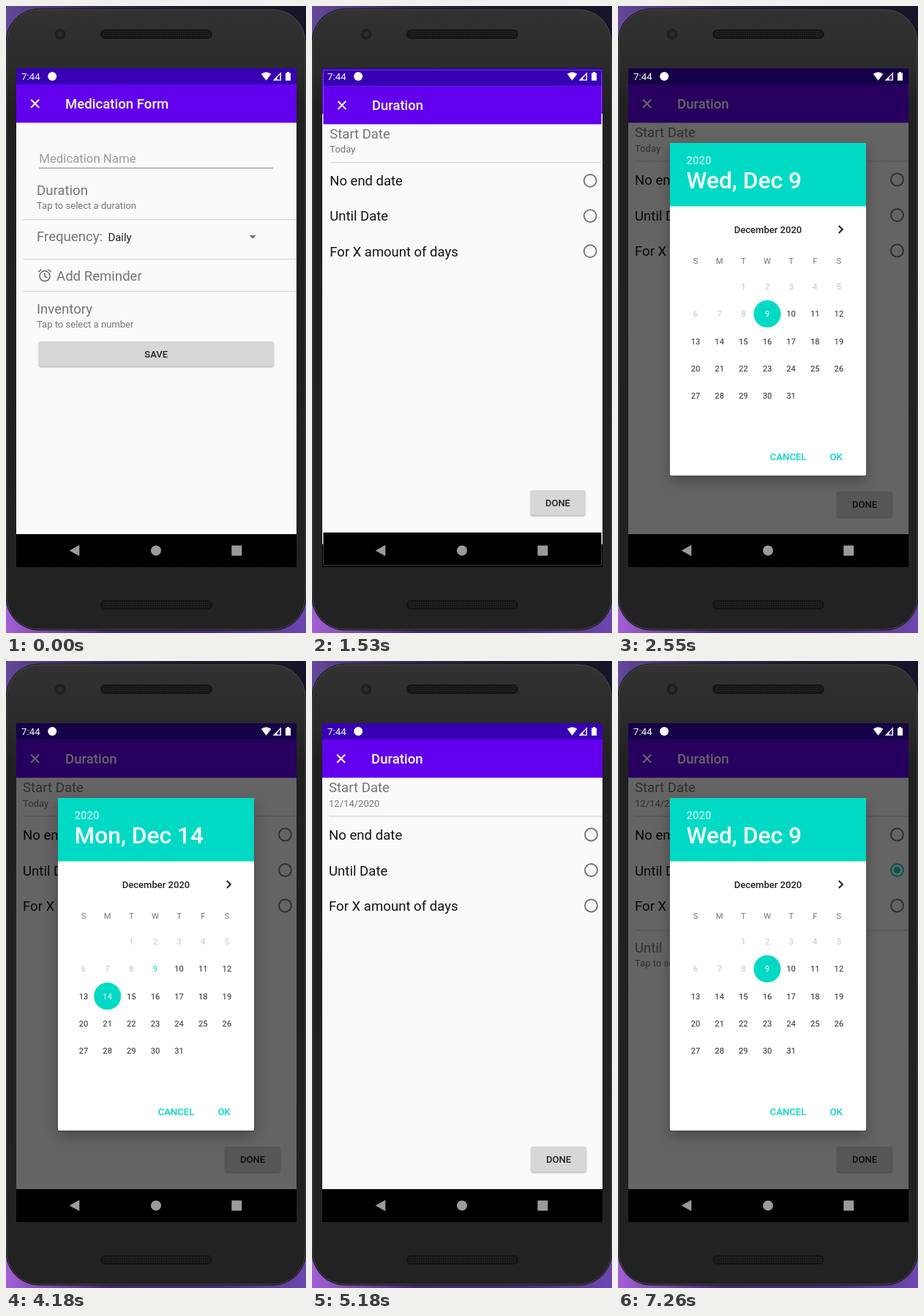
An HTML page for the animation above (8000 ms loop, 410x856 px).

```html
<!DOCTYPE html>
<html lang="en">
<head>
<meta charset="utf-8">
<title>Medication form</title>
<style>
  html, body { margin: 0; width: 100%; height: 100%; overflow: hidden; background: #222; }
  svg { display: block; width: 410px; height: 856px; font-family: Roboto, sans-serif; }
  .shadow { filter: drop-shadow(0 1px 1px rgba(0, 0, 0, .35)); }
  .lifted { filter: drop-shadow(0 8px 9px rgba(0, 0, 0, .28)); }
</style>
</head>
<body>
<svg id="stage" viewBox="0 0 410 856"></svg>
<script>
const LOOP = 8000;
const TEAL = '#00dac5', GREY = '#757575', INK = '#141414';
const LARGE = 18.6, SMALL = 13.05;

const REFRESHES = [0, 1240, 1310, 1380, 1450, 1530, 1610, 1690, 2230, 2310, 2390, 2470, 2550,
  4100, 4180, 5030, 5110, 5180, 6190, 6270, 6340, 6420, 6490, 6570, 6640, 7110, 7190, 7260];

const rect = (x, y, w, h, fill, more = '') =>
  `<rect x="${x}" y="${y}" width="${w}" height="${h}" fill="${fill}" ${more}/>`;
const circle = (x, y, r, fill, more = '') =>
  `<circle cx="${x}" cy="${y}" r="${r}" fill="${fill}" ${more}/>`;
const line = (d, stroke, width = 2) =>
  `<path d="${d}" fill="none" stroke="${stroke}" stroke-width="${width}"/>`;
const text = (x, y, size, fill, str, more = '') =>
  `<text x="${x}" y="${y}" font-size="${size}" fill="${fill}" ${more}>${str}</text>`;
const group = (id, body) => `<g id="${id}">${body}</g>`;
const MEDIUM = 'font-weight="500"';
const CENTER = 'text-anchor="middle"';

const divider = y => rect(23, y, 374, 1.3, '#d9d9d9');
const highlight = (id, x, baseline, w) => rect(x, baseline - 19, w, 24, '#000', `id="${id}" opacity="0"`);
const button = (x, y, w, h, label) =>
  rect(x, y, w, h, '#d6d7d7', 'rx="2" class="shadow"') +
  text(x + w / 2, y + h / 2 + 4.6, SMALL, '#212121', label, `${MEDIUM} ${CENTER}`);

const windowFrame = (title, body) =>
  rect(14, 85, 383, 681, '#fafafa') +
  rect(14, 85, 383, 22.4, '#3700b3') +
  rect(14, 107, 383, 52.4, '#6200ee') +
  line('M34.2 127.7l11 11m0-11l-11 11', '#fff') +
  text(81, 140, LARGE, '#fff', title, MEDIUM) +
  body + rect(14, 721, 383, 45, '#000');

const alarmIcon =
  circle(53, 368.7, 7, 'none', `stroke="${GREY}" stroke-width="1.7"`) +
  line('M53 364.5v4.7l3.4 2M44.2 363.2l4.2-3.6M61.8 363.2l-4.2-3.6', GREY, 1.6);

const formScreen = () => windowFrame('Medication Form',
  text(45.3, 214, 16.8, '#9c9c9c', 'Medication Name') + rect(45, 220.7, 320, 1, '#808080') +
  highlight('durationTap', 42, 258, 70) +
  text(42, 258, LARGE, GREY, 'Duration') +
  text(42, 277, SMALL, GREY, 'Tap to select a duration') + divider(291) +
  text(42, 321, LARGE, GREY, 'Frequency:') + text(139.5, 321, 14.9, '#212121', 'Daily') +
  `<path d="M332.5 313h9.4l-4.7 4.8z" fill="${GREY}"/>` + divider(345) +
  alarmIcon + text(69, 374.7, LARGE, GREY, 'Add Reminder') + divider(389) +
  text(42, 419.5, LARGE, GREY, 'Inventory') +
  text(42, 439, SMALL, GREY, 'Tap to select a number') +
  button(45, 458, 320.5, 34, 'SAVE'));

const option = (y, label, id = '') =>
  text(23, y + 7, LARGE, INK, label) +
  circle(381.5, y, 8.5, 'none', `stroke="${GREY}" stroke-width="1.9" ${id && `id="${id}"`}`);

const durationScreen = () => windowFrame('Duration',
  highlight('startTap', 23, 179, 83) +
  text(23, 179, LARGE, GREY, 'Start Date') +
  text(23, 198.7, SMALL, GREY, 'Today', 'id="startDate"') + divider(211.3) +
  circle(381.5, 285.5, 18, '#000', 'id="ripple" opacity="0"') +
  option(237, 'No end date') +
  option(285.5, 'Until Date', 'untilRing') + circle(381.5, 285.5, 0, TEAL, 'id="untilDot"') +
  option(334, 'For X amount of days') +
  group('untilSection', divider(367) + highlight('untilTap', 23, 397.7, 37) +
    text(23, 397.7, LARGE, GREY, 'Until') +
    text(23, 416.7, SMALL, GREY, 'Tap to select a date')) +
  button(299.6, 663, 74.8, 34.5, 'DONE'));

const columnX = col => 106 + 32.65 * col;
const dayPlace = day => {
  const cell = day + 1; // the month starts on a Tuesday
  return [columnX(cell % 7), 383 + 37.3 * Math.floor(cell / 7)];
};

function calendar() {
  let out = text(205, 309.5, SMALL, '#212121', 'December 2020', `${MEDIUM} ${CENTER}`) +
    line('M301.8 300l5 5l-5 5', '#212121');
  out += [...'SMTWTFS'].map((d, i) => text(columnX(i), 352, 11.2, GREY, d, CENTER)).join('');
  for (const day of [9, 14]) out += circle(...dayPlace(day), 18.5, TEAL, `id="mark${day}"`);
  for (let day = 1; day <= 31; day++) {
    const [x, y] = dayPlace(day);
    out += text(x, y + 4, 11.2, day < 9 ? '#c4c4c4' : '#2b2b2b', day, `${CENTER} id="day${day}"`);
  }
  return out;
}

const dialogBox = () =>
  rect(71, 187, 268, 454, '#fff', 'rx="2" class="lifted"') +
  `<path d="M71 273.5v-84.5q0-2 2-2h264q2 0 2 2v84.5z" fill="${TEAL}"/>` +
  text(93.5, 216, 14.9, '#fff', '2020', `${MEDIUM} opacity=".7"`) +
  text(93.5, 249, 31.7, '#fff', '', `${MEDIUM} id="picked"`) +
  group('calendar', calendar()) +
  text(232.5, 619.7, SMALL, TEAL, 'CANCEL', `${MEDIUM} ${CENTER}`) +
  text(298, 619.7, SMALL, TEAL, 'OK', `${MEDIUM} ${CENTER}`);

const speaker = y =>
  rect(129, y, 153, 13, '#151515', 'rx="6.5"') +
  rect(132, y + 2, 147, 9, 'url(#mesh)', 'rx="4"');

const gradient = (id, stops, direction = '') =>
  `<linearGradient id="${id}" ${direction}>` + stops.map(([at, color]) =>
    `<stop offset="${at}" stop-color="${color}"/>`).join('') + '</linearGradient>';

const phone = () => `<defs>
  ${gradient('above', [[0, '#64489a'], [.3, '#35264f'], [.6, '#1f1a2e'], [1, '#17142a']])}
  ${gradient('below', [[0, '#a25fd6'], [.35, '#44266c'], [.7, '#472a78'], [1, '#6d47b0']])}
  ${gradient('body', [[0, '#323232'], [.09, '#2b2b2b'], [.16, '#202020'], [1, '#222']], 'x2="0" y2="1"')}
  <pattern id="mesh" width="3" height="3" patternUnits="userSpaceOnUse">${circle(1.5, 1.5, .8, '#303030')}</pattern>
  <clipPath id="glass">${rect(14, 85, 383, 681, '#000')}</clipPath></defs>` +
  rect(0, 0, 410, 428, 'url(#above)') + rect(0, 428, 410, 428, 'url(#below)') +
  rect(-.5, 3.5, 411, 849, '#141414', 'rx="46"') +
  rect(1, 5, 408, 846, 'url(#body)', 'rx="44" stroke="#4a4a4a"') +
  circle(74, 38.5, 7.5, '#202020') + circle(74, 38.5, 3.5, '#2c2c2c') +
  speaker(32) + speaker(811);

const systemBars = () =>
  text(21, 101, 13.3, '#fff', '7:44') + circle(63.2, 96, 6, '#fff') +
  '<path d="M348.8 92.8q6.8-5.2 13.6 0l-6.8 8.9zM364.5 101.7l11.5-11.5v11.5zM382 91.4h2v-1.4h3v1.4h2v10.4h-7z" fill="#fff"/>' +
  '<path d="M370.5 98v2.5h4v-7z" fill="#3700b3"/>' +
  '<path d="M100.3 735.8v15.2l-13.6-7.6z" fill="#9a9a9a"/>' +
  circle(205, 743.4, 7, '#9a9a9a') + rect(308.3, 736.4, 14, 14, '#9a9a9a', 'rx="1"');

const stage = document.getElementById('stage');
stage.innerHTML = phone() +
  `<g clip-path="url(#glass)">${group('form', formScreen())}${group('duration', durationScreen())}` +
  rect(14, 85, 383, 681, '#000', 'id="dim"') + group('dialog', dialogBox()) + '</g>' + systemBars();

const parts = {};
stage.querySelectorAll('[id]').forEach(el => parts[el.id] = el);
const set = (id, attrs) => {
  for (const name in attrs) parts[id].setAttribute(name, attrs[name]);
};
const label = (id, str) => {
  if (parts[id].textContent !== str) parts[id].textContent = str;
};
const ramp = (t, from, to) => Math.min(1, Math.max(0, (t - from) / (to - from)));
const zoom = s => `translate(205.5 425.5) scale(${s}) translate(-205.5 -425.5)`;
const tapShade = (t, start) =>
  .18 * ramp(t, start, start + 160) * (1 - ramp(t, start + 240, start + 390));

function draw(t) {
  // Opening the duration screen: both windows zoom, the new one fades in.
  const x = ramp(t, 1330, 1730);
  const enter = t >= 1690 ? 1 : 1 - Math.exp(-5.75 * Math.max(0, x - .05));
  set('form', { transform: zoom(1 + .05 * enter), visibility: enter < 1 ? 'visible' : 'hidden' });
  set('duration', { transform: zoom(.9 + .1 * enter), opacity: ramp(t, 1380, 1463) });
  set('durationTap', { opacity: tapShade(t, 1160) });
  set('startTap', { opacity: tapShade(t, 2150) });
  set('untilTap', { opacity: tapShade(t, 6870) });

  // Date dialog: shown, dismissed, and shown again for the end date.
  const again = t >= 7000;
  const opened = again ? 7030 : 2310;
  const closeDialog = again ? 0 : ramp(t, 4960, 5087);
  const closeDim = again ? 0 : ramp(t, 4990, 5145);
  const dim = ramp(t, opened + 40, opened + 200);
  set('dialog', { opacity: ramp(t, opened, opened + 143) * (1 - closeDialog) });
  set('dim', { opacity: .6 * dim * (1 - closeDim) });
  set('calendar', { opacity: ramp(t, opened + 30, opened + 190) });

  const moved = again ? 0 : ramp(t, 4040, 4160);
  set('mark9', { opacity: 1 - moved });
  set('mark14', { opacity: moved });
  set('day9', { fill: moved ? TEAL : '#fff' });
  set('day14', { fill: moved ? '#fff' : '#2b2b2b' });
  label('picked', moved ? 'Mon, Dec 14' : 'Wed, Dec 9');
  label('startDate', t >= 5030 ? '12/14/2020' : 'Today');

  // Choosing "Until Date".
  set('ripple', {
    r: 10 + 8 * ramp(t, 6110, 6340),
    opacity: .12 * ramp(t, 6110, 6270) * (1 - ramp(t, 6400, 6640))
  });
  set('untilRing', { stroke: t >= 6270 ? TEAL : GREY });
  set('untilDot', { r: 4.6 * ramp(t, 6230, 6420) });
  set('untilSection', { visibility: t >= 6340 ? 'visible' : 'hidden' });
}

function tick() {
  const now = performance.now() % LOOP;
  draw(REFRESHES.findLast(at => at <= now));
  requestAnimationFrame(tick);
}
tick();
</script>
</body>
</html>
```
